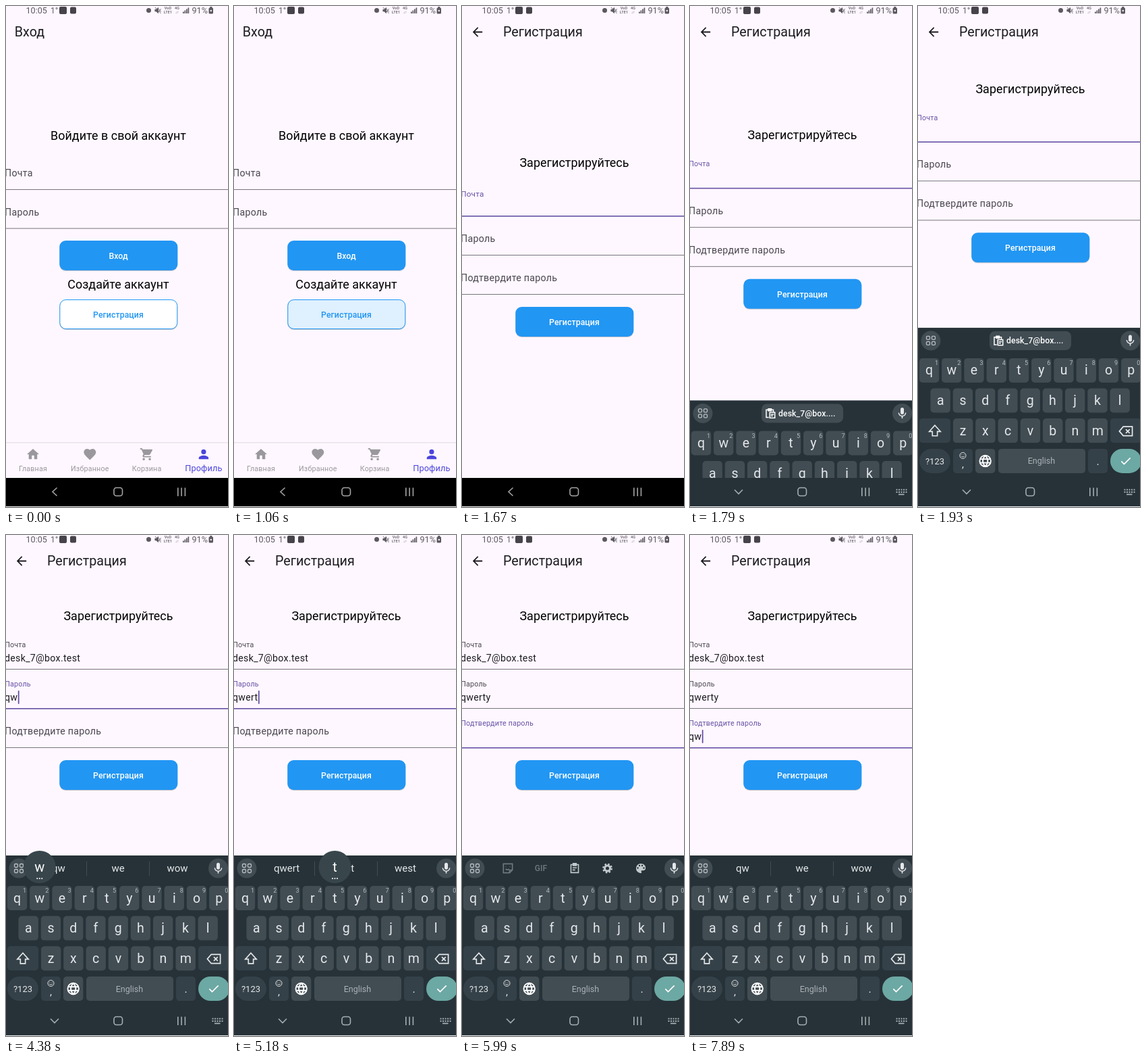
Animation of 329 by 741 pixels, one loop 8 s. Source, as an HTML page:

```html
<!DOCTYPE html>
<html lang="ru">
<head>
<meta charset="utf-8">
<style>
html, body { margin: 0; width: 100%; height: 100%; overflow: hidden; background: #fef7ff; }
svg { display: block; width: 329px; height: 741px; font-family: Roboto, "Noto Sans", sans-serif; }
.m { text-anchor: middle; }
.b { font-weight: 500; letter-spacing: .07px; }
.h { letter-spacing: .05px; }
.s { letter-spacing: .19px; }
.f { letter-spacing: .28px; }
.raised { filter: drop-shadow(0 1px .6px #0003); }
</style>
</head>
<body>
<svg id="stage" viewBox="0 0 329 741">
  <defs><clipPath id="outline"><rect x="79" y="434" width="175" height="44" rx="9"/></clipPath></defs>
  <g id="login"></g>
  <g id="register"></g>
  <g id="status"></g>
  <g id="keyboard"><g id="keys"></g><g id="strip"></g><g id="popup"></g></g>
  <g id="navbar"></g>
  <rect y="740" width="329" height="1" fill="#efedf0"/>
</svg>
<script>
const LOOP = 8000, CX = 166.5;
const BG = '#fef7ff', INK = '#1d1b20', GREY = '#49454f', PURPLE = '#6750a4', BLUE = '#2196f3';
const KB = '#263238', KEY = '#414c53', DARK = '#354148', LIGHT = '#e4e8ea';
// Type sizes of the app
const TITLE = 19.7, HEAD = 17.9, BODY = 14.2, SMALL = 10.7, LABEL = 12.3, GLYPH = 21.5;
const $ = id => document.getElementById(id);

const text = (s, x, y, size, fill, cls = '') =>
  `<text x="${x}" y="${y + size * .36}" font-size="${size}" fill="${fill}" class="${cls}">${s}</text>`;
const rect = (x, y, w, h, r, fill, more = '') =>
  `<rect x="${x}" y="${y}" width="${w}" height="${h}" rx="${r}" fill="${fill}" ${more}/>`;
const disc = (x, y, r, fill, more = '') => `<circle cx="${x}" cy="${y}" r="${r}" fill="${fill}" ${more}/>`;
// Icons are drawn on a 24-unit grid and centred on x, y
const icon = (d, x, y, size, more) =>
  `<path d="${d}" transform="translate(${x - size / 2} ${y - size / 2}) scale(${size / 24})" ${more}/>`;
const solid = c => `fill="${c}"`;
const line = (c, w = 2) => `fill="none" stroke="${c}" stroke-width="${w}"`;

const ICON = {
  home: 'M10 20v-6h4v6h5v-8h3L12 3 2 12h3v8z',
  heart: 'M12 21.35l-1.45-1.32C5.4 15.36 2 12.28 2 8.5 2 5.42 4.42 3 7.5 3c1.74 0 3.41.81 4.5 2.09C13.09 3.81 14.76 3 16.5 3 19.58 3 22 5.42 22 8.5c0 3.78-3.4 6.86-8.55 11.54z',
  cart: 'M7 18a2 2 0 1 0 0 4 2 2 0 0 0 0-4zM1 2v2h2l3.6 7.59-1.35 2.45A2 2 0 0 0 7 17h12v-2H7.4l1-1.99h7.45c.75 0 1.41-.41 1.75-1.03l3.58-6.49A1 1 0 0 0 20.3 4H5.21l-.94-2zm16 16a2 2 0 1 0 0 4 2 2 0 0 0 0-4z',
  person: 'M12 12a4 4 0 1 0 0-8 4 4 0 0 0 0 8zm0 2c-2.67 0-8 1.34-8 4v2h16v-2c0-2.66-5.33-4-8-4z',
  back: 'M20 11H7.83l5.59-5.59L12 4l-8 8 8 8 1.41-1.41L7.83 13H20z',
  mic: 'M12 14a3 3 0 0 0 3-3V5a3 3 0 0 0-6 0v6a3 3 0 0 0 3 3zm5.3-3a5.3 5.1 0 0 1-10.6 0H5c0 3.41 2.72 6.23 6 6.72V21h2v-3.28c3.28-.48 6-3.3 6-6.72z',
  muted: 'M3 9v6h4l6 6V3L7 9zM15 7l7 10M22 7l-7 10M3 2l19 20',
  clip: 'M5 5h14v15H5zM9 3h6v4H9zM8 11h8M8 15h5',
  paste: 'M9 20H4V5h14v4M8 3h6v4H8zM11 10h10v11H11zM13 14h6M13 17h4',
  sticker: 'M4 4h16v11l-5 5H4zM20 15h-5v5M8 9h1M15 9h1M8 13q3 3 6 0',
  palette: 'M12 3a9 9 0 0 0 0 18c.83 0 1.5-.67 1.5-1.5 0-.39-.15-.74-.39-1.01-.23-.26-.38-.61-.38-.99 0-.83.67-1.5 1.5-1.5H16a5 5 0 0 0 5-5C21 6.58 16.97 3 12 3z',
  shift: 'M12 3 3 13h5v7h8v-7h5z',
  erase: 'M8 5h14v14H8L2 12zM12 9l6 6M18 9l-6 6',
  globe: 'M3 12a9 9 0 1 0 18 0 9 9 0 1 0-18 0M12 3q-8 9 0 18q8-9 0-18M4 9h16M4 15h16',
  check: 'M4 12.5l5 5L20 6.5',
  smile: 'M3 12a9 9 0 1 0 18 0 9 9 0 1 0-18 0M7.5 14q4.5 5 9 0M8 9h1.5M14.5 9H16'
};

const clamp = v => Math.min(1, Math.max(0, v));
const easeOut = v => 1 - (1 - clamp(v)) ** 3;
const easeInOut = v => { v = clamp(v); return v < .5 ? 4 * v ** 3 : 1 - (2 - 2 * v) ** 3 / 2; };

// Script of the recording
const TAP = 870, OPEN = 1080, KEYBOARD_UP = 1740;
const typing = (word, times) => times.map((time, i) => ({ time, text: word.slice(0, i + 1), key: word[i] }));
const FIELDS = [
  { label: 'Почта', from: 1575, to: 3250, log: [{ time: 2540, text: 'desk_7@box.test' }] },
  { label: 'Пароль', from: 3250, to: 5830, log: typing('qwerty', [4100, 4330, 4600, 4880, 5180, 5420]) },
  { label: 'Подтвердите пароль', from: 5830, to: LOOP, log: typing('qw', [7220, 7470]) }
];
const HINTS = {
  q: ['q', 'quite', 'question'], qw: ['qw', 'we', 'wow'], qwe: ['qwe', 'we', 'were'],
  qwer: ['qwer', 'wet', 'were'], qwert: ['qwert', 'wet', 'west'], qwerty: ['qwerty', 'Qwerty', 'wert']
};
const lastEntry = (field, t) => field.log.filter(e => e.time <= t).pop();
const keyboardLift = t => easeOut((t - KEYBOARD_UP) / 240);

const button = (label, y) =>
  rect(79.3, y, 175, 44, 9, BLUE, 'class="raised"') + text(label, CX, y + 22.5, LABEL, '#fff', 'm b');
const rule = (y, on) => rect(0, y, 329, on ? 1.6 : 1, 0, on ? PURPLE : '#79747e');

function drawLogin(t) {
  const tabs = [['home', 'Главная'], ['heart', 'Избранное'], ['cart', 'Корзина'], ['person', 'Профиль']];
  const ripple = clamp((t - TAP) / 330);
  $('login').innerHTML = rect(0, 0, 329, 741, 0, BG) + text('Вход', 12.8, 38, TITLE, INK) +
    text('Войдите в свой аккаунт', CX, 192, HEAD, '#000', 'm h') +
    text('Почта', -2, 247, BODY, GREY, 'f') + rule(271) +
    text('Пароль', -2, 305, BODY, GREY, 'f') + rule(328.5) +
    button('Вход', 347) + text('Создайте аккаунт', CX, 412, HEAD, '#000', 'm h') +
    rect(79.8, 434.5, 174, 43, 9, '#fff', `stroke="${BLUE}" class="raised"`) +
    (ripple ? `<g clip-path="url(#outline)">${disc(CX, 456, 15 + 95 * easeOut(ripple), BLUE, 'opacity=".14"')}</g>` : '') +
    text('Регистрация', CX, 456.5, LABEL, BLUE, 'm b') +
    rect(0, 645, 329, 1, 0, '#e9e3ea') + rect(0, 646, 329, 1, 0, '#f3edf4') +
    tabs.map(([name, label], i) => {
      const x = 40 + 84.3 * i, on = i === 3, c = on ? '#4b45dc' : '#9a989c';
      return icon(ICON[name], x, 663, GLYPH, solid(c)) +
        text(label, x, on ? 683 : 684.5, on ? 12.7 : SMALL, c, 'm s');
    }).join('');
}

function drawField(field, i, t) {
  const y = 310 + 58 * i, on = t >= field.from && t < field.to;
  const up = easeInOut((t - field.from) / 167 * .8 + .12 * (t > field.from));
  const value = (lastEntry(field, t) || { text: '' }).text;
  return `<g class="f">${text(field.label, -2 + .2 * up, y - 24 - 11.5 * up, BODY + (SMALL - BODY) * up, on ? PURPLE : GREY, up > .5 ? 's' : '')}` +
    `<g class="value">${text(value, -2, y - 16, BODY, INK)}</g></g>` + rule(y, on);
}

function drawRegister(t) {
  // The layout trails the keyboard by one screen refresh
  const lift = keyboardLift(t - 17);
  $('register').innerHTML = rect(0, 0, 329, 741, 0, BG) + icon(ICON.back, 23, 38.5, GLYPH, solid(INK)) +
    text('Регистрация', 61, 38, TITLE, INK) +
    `<g transform="translate(0 ${-112 * lift})">` + text('Зарегистрируйтесь', CX, 232, HEAD, '#000', 'm h') +
    FIELDS.map((f, i) => drawField(f, i, t)).join('') + button('Регистрация', 445) + '<g id="caret"></g></g>';

  const i = FIELDS.findIndex(f => t >= f.from && t < f.to);
  const entry = i >= 0 && lastEntry(FIELDS[i], t);
  if (entry && (t - entry.time) % 1000 < 500) {
    const width = $('register').querySelectorAll('.value text')[i].getComputedTextLength();
    $('caret').innerHTML = rect(width - 1.5, 284 + 58 * i, 1.8, 20, .9, PURPLE);
  }
}

function drawPages(t) {
  const p = clamp((t - OPEN) / 360), e = easeOut(p);
  const zoom = s => `translate(${CX} 370) scale(${s}) translate(${-CX} -370)`;
  $('login').style.display = p < 1 ? '' : 'none';
  $('register').style.display = p ? '' : 'none';
  if (p < 1) drawLogin(t);
  if (p) drawRegister(t);
  $('login').setAttribute('transform', zoom(1 + .05 * e));
  $('register').setAttribute('transform', zoom(.85 + .15 * e));
  $('register').setAttribute('opacity', clamp(p * 2.5));
}

function drawStrip(field, value) {
  let s = disc(19, 493, 14.5, KEY) + disc(314.5, 493, 14.5, KEY) + icon(ICON.mic, 314.5, 493, 20, solid(LIGHT));
  for (const x of [12.5, 20.5]) for (const y of [486.5, 494.5]) s += rect(x, y, 5, 5, 1.5, 'none', 'stroke="#b9c1c5" stroke-width="1.3"');
  if (value) {
    const hints = HINTS[value] || ['of', 'is', 'I'];
    s += hints.map((w, i) => text(w, 78 + 88 * i, 493, 15, LIGHT, 'm')).join('') +
      [119, 212].map(x => rect(x, 483, 1, 21, 0, KEY)).join('');
  } else if (field === FIELDS[0]) {
    s += rect(106, 479, 121, 28, 8, KEY) + icon(ICON.paste, 119, 493, 18, line('#fff')) +
      text('desk_7@box....', 131, 493, 12.3, '#fff', 'b');
  } else {
    const dim = '#6d797f', c = '#c3cacd';
    s += icon(ICON.sticker, 68, 493, 20, line(dim)) + text('GIF', 117, 493, 12, dim, 'm b') +
      icon(ICON.clip, 167, 493, 19, line(c)) +
      disc(215.5, 493, 4, 'none', `stroke="${c}" stroke-width="3"`) +
      disc(215.5, 493, 6.2, 'none', `stroke="${c}" stroke-width="2.4" stroke-dasharray="2.435"`) +
      icon(ICON.palette, 265, 493, 19, solid(c)) +
      [[-4.5, -.5], [-2, -4], [2, -4], [4.5, -.5]].map(([x, y]) => disc(265 + x, 493 + y, 1.2, KB)).join('');
  }
  return s;
}

const ROWS = ['qwertyuiop', 'asdfghjkl', 'zxcvbnm'];
const keyX = (row, i) => [16.5, 33.2, 66.7][row] + 33.25 * i;

function drawKeys() {
  let s = rect(0, 474, 329, 280, 0, KB);
  ROWS.forEach((row, r) => [...row].forEach((ch, i) => {
    const x = keyX(r, i), y = 537 + 44.6 * r;
    s += rect(x - 14.7, y - 18, 29.4, 36, 5, KEY) + text(ch, x, y - .5, 19.5, LIGHT, 'm');
    if (!r) s += text((i + 1) % 10, x + 11, y - 11, 9, '#b4bcc0', 'm');
  }));
  const y = 671;
  s += rect(2, 608, 46, 36, 5, DARK) + icon(ICON.shift, 25, 626.5, 22, line(LIGHT, 1.8)) +
    rect(285, 608, 46, 36, 5, DARK) + icon(ICON.erase, 308, 627, 23, line(LIGHT, 1.8)) +
    rect(2, y - 18, 46, 36, 18, DARK) + text('?123', 25, y, 13, LIGHT, 'm') +
    rect(52, y - 18, 29, 36, 5, DARK) + icon(ICON.smile, 66.5, 663, 12, line(LIGHT)) + text(',', 66.5, 676, 15, LIGHT, 'm') +
    rect(85, y - 18, 29.4, 36, 5, KEY) + icon(ICON.globe, 99.7, y, 22, line('#fff')) +
    rect(119, y - 18, 129, 36, 5, KEY) + text('English', 183, y, 12.5, '#aab2b6', 'm') +
    rect(252, y - 18, 29, 36, 5, DARK) + text('.', 266.5, y, 16, LIGHT, 'm') +
    rect(285, y - 18, 46, 36, 18, '#6ca8a4') + icon(ICON.check, 308, y, 20, line('#fff'));
  $('keys').innerHTML = s;
}

function drawKeyboard(t, lift) {
  $('keyboard').style.display = lift ? '' : 'none';
  if (!lift) return;
  $('keyboard').setAttribute('transform', `translate(0 ${224 * (1 - lift)})`);
  const field = FIELDS.find(f => t >= f.from && t < f.to);
  const entry = lastEntry(field, t);
  $('strip').innerHTML = drawStrip(field, entry && entry.text);
  let s = '';
  if (entry && entry.key && t - entry.time < 180) {
    const x = keyX(0, ROWS[0].indexOf(entry.key));
    s = disc(x, 491, 24, '#38464c') + text(entry.key, x, 491, 20, '#fff', 'm') +
      [-3.5, 0, 3.5].map(d => disc(x + d, 508, 1, '#fff')).join('');
  }
  $('popup').innerHTML = s;
}

function drawNavbar(open) {
  const c = open ? '#a4adb1' : '#a3a3a3';
  const dots = y => `<path d="M305.5 ${y}h16" stroke="${c}" stroke-width="2" stroke-dasharray="2 1.5"/>`;
  $('navbar').innerHTML = rect(0, 698, 329, 43, 0, open ? KB : '#000') +
    `<path d="${open ? 'M66 715.5l6 6 6-6' : 'M75.5 712.5l-6.500 6 6.500 6'}" ${line(c, 1.6)}/>` +
    rect(160, 712.5, 12.5, 12, 3.5, 'none', `stroke="${c}" stroke-width="1.6"`) +
    [254, 259.3, 264.6].map(x => rect(x, 712.5, 1.6, 12.5, 0, c)).join('') +
    (open ? dots(715.5) + dots(719) + rect(309, 721.5, 8.5, 1.8, 0, c) : '');
}

function drawStatus() {
  const c = '#5c5860';
  $('status').innerHTML = text('10:05', 29.5, 6.5, 12.6, c) + text('1°', 66, 6.5, 12, c) +
    rect(79, 1, 11, 11, 2, '#47434a') + rect(95, 1.5, 9, 10, 2, '#47434a') +
    disc(211.5, 6.5, 3.5, c) +
    icon(ICON.muted, 225, 6.5, 11, `fill="${c}" stroke="${c}" stroke-width="1.8"`) +
    text('VoD', 240, 3.5, 5.5, c, 'm b') + text('LTE1', 240, 9, 5.5, c, 'm b') +
    text('4G', 253.5, 3.5, 5.5, c, 'm b') + text('↓↑', 253.5, 9, 5.5, c, 'm b') +
    [0, 1, 2, 3].map(i => rect(262 + 2.5 * i, 8.5 - 2 * i, 1.7, 2.5 + 2 * i, 0, c)).join('') +
    text('91%', 275.5, 6.5, 12.6, c) +
    rect(300.5, 2.5, 6.5, 9, 1.5, c) + rect(302.3, 1, 3, 2, .5, c) + disc(303.8, 7, 1.2, BG);
}

let wasOpen;
function frame(now) {
  const t = now % LOOP, lift = keyboardLift(t), open = lift > 0;
  drawPages(t);
  drawKeyboard(t, lift);
  if (open !== wasOpen) drawNavbar(wasOpen = open);
  requestAnimationFrame(() => frame(performance.now() - start));
}

drawStatus();
drawKeys();
const start = performance.now();
frame(0);
</script>
</body>
</html>
```
